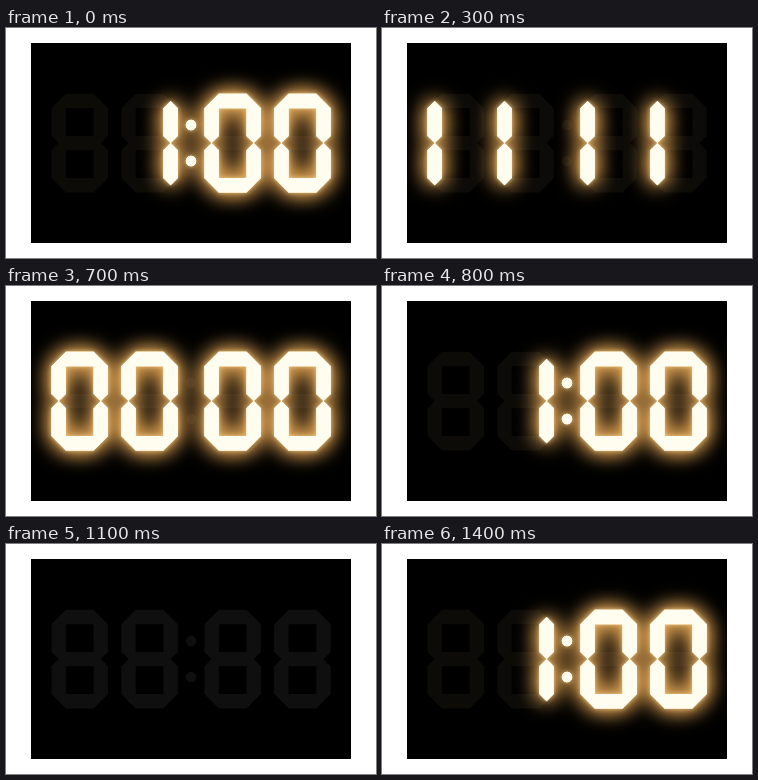
Write an HTML page with a canvas that moves like this. It is 370 by 230 pixels and loops after 1500 ms.

```html
<!DOCTYPE html>
<html lang="en">
<head>
<meta charset="utf-8">
<style>
  html, body { margin: 0; width: 100%; height: 100%; overflow: hidden; background: #fff; }
  canvas { display: block; }
</style>
</head>
<body>
<canvas id="clock" width="370" height="230"></canvas>
<script>
const ctx = document.getElementById('clock').getContext('2d');
const STEP = 100, LOOP = 1500;
const LEFT = [52.7, 122.5, 205.6, 275.4];
const TOP = 73, SIZE = 42.1, HALF = 7.2;

// Segment start corner in grid units, and whether it runs vertically.
const SEGMENTS = {
  a: [0, 0, false], b: [1, 0, true], c: [1, 1, true], d: [0, 2, false],
  e: [0, 1, true], f: [0, 0, true], g: [0, 1, false]
};
const SWEEP = 'efabcd';

function addSegment(path, left, name) {
  const [col, row, vertical] = SEGMENTS[name];
  const outline = [[0, 0], [HALF, -HALF], [SIZE - HALF, -HALF],
                   [SIZE, 0], [SIZE - HALF, HALF], [HALF, HALF]];
  outline.forEach(([u, v], i) => {
    const x = left + col * SIZE + (vertical ? v : u);
    const y = TOP + row * SIZE + (vertical ? u : v);
    i ? path.lineTo(x, y) : path.moveTo(x, y);
  });
  path.closePath();
}

function display(digits, colon) {
  const path = new Path2D();
  digits.forEach((segments, i) => {
    for (const name of segments) addSegment(path, LEFT[i], name);
  });
  if (colon) {
    for (const y of [97, 133]) {
      path.moveTo(190.2, y);
      path.arc(185, y, 5.2, 0, 2 * Math.PI);
    }
  }
  return path;
}

const ghost = display(Array(4).fill('abcdefg'), true);
const minute = display(['', 'bc', SWEEP, SWEEP], true);

// The segments sweep in one by one, then the time blinks.
function litAt(step) {
  if (step >= 1 && step <= 7) return display(Array(4).fill(SWEEP.slice(0, step - 1)), false);
  return step % 2 ? null : minute;
}

function glow(path, color, blur) {
  ctx.shadowColor = color;
  ctx.shadowBlur = blur;
  ctx.fill(path);
}

function draw(time) {
  const step = Math.floor(time % LOOP / STEP);
  const lit = litAt(step);
  ctx.clearRect(0, 0, 370, 230);
  ctx.save();
  ctx.beginPath();
  ctx.rect(25, 15, 320, 200);
  ctx.clip();
  ctx.fillStyle = '#000';
  ctx.fillRect(25, 15, 320, 200);
  ctx.fillStyle = lit ? '#0d0b08' : '#0f0f0f';
  ctx.fill(ghost);
  if (lit) {
    ctx.fillStyle = '#fffdf0';
    glow(lit, 'rgb(255,185,95)', 23);
    glow(lit, 'rgb(255,185,95)', 19);
    glow(lit, 'rgba(255,225,160,.75)', 5);
  }
  ctx.restore();
}

const start = performance.now();
(function frame() {
  draw(performance.now() - start);
  requestAnimationFrame(frame);
})();
</script>
</body>
</html>
```
